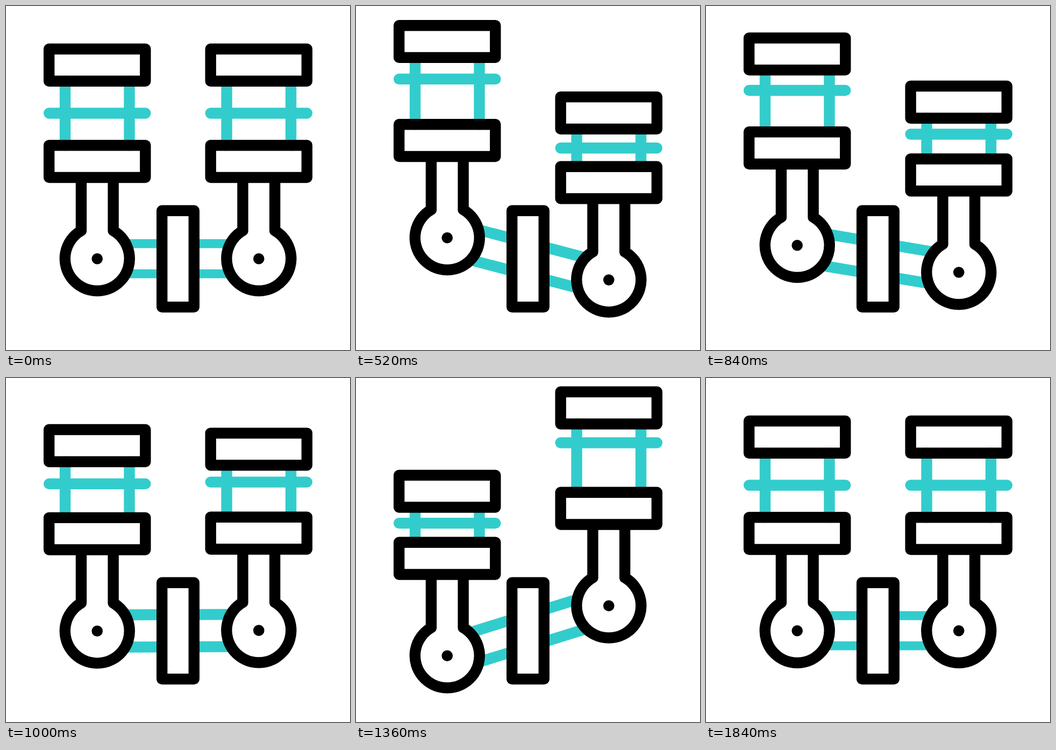
Animation of 640 by 640 pixels, one loop 2 s. Source, as an HTML page:

```html
<!DOCTYPE html>
<html lang="en">
<head>
<meta charset="utf-8">
<title>Pistons</title>
<style>
  html, body { margin: 0; width: 100%; height: 100%; overflow: hidden; background: #fff; }
  svg { display: block; width: 100%; height: 100%; }
  .ink { stroke: #000; stroke-width: 20.4; stroke-linejoin: round; fill: none; }
  .solid { fill: #fff; }
  .teal { stroke: #3cc; stroke-width: 20.4; stroke-linecap: round; fill: none; }
</style>
</head>
<body>
<svg viewBox="0 0 640 640">
  <g id="shaft" class="teal">
    <path id="upper"/>
    <path id="lower"/>
  </g>
  <rect class="ink solid" x="290.2" y="380.8" width="59.6" height="179.3"/>
  <g id="pistons"></g>
</svg>
<script>
const LOOP = 2000, STEP = 40;
const KEYS = [120, 697, 982, 1270, 1825];

// Vertical offsets at the three inner keys; every part rests at 0.
const MOVES = [
  { x: 0, head: [-56.5, 15, 108.5], ring: [-82, -3.5, 76], rod: [-50.3, 0, 50] },
  { x: 300.6, head: [115, 23.5, -58.3], ring: [83.5, -5, -85], rod: [50.8, 0, -50] }
];

const $ = id => document.getElementById(id);
const ease = x => x * x * (3 - 2 * x);

function offset(values, t) {
  if (t <= KEYS[0] || t >= KEYS[4]) return 0;
  const track = [0, ...values, 0];
  const i = KEYS.findIndex(k => k > t) - 1;
  const p = ease((t - KEYS[i]) / (KEYS[i + 1] - KEYS[i]));
  return track[i] + (track[i + 1] - track[i]) * p;
}

const box = y => `<rect x="80.1" y="${y}" width="179.2" height="59.7"`;

$("pistons").innerHTML = MOVES.map(m => `
  <g transform="translate(${m.x} 0)">
    <g class="rod">
      <path class="ink solid" d="M139.9 319V418A60 60 0 1 0 199.6 418V319"/>
      <circle cx="169.7" cy="470.2" r="10.3"/>
      ${box(259.3)} class="solid"/>
    </g>
    <path class="teal posts"/>
    <path class="teal ring" d="M80.1 199.5H259.3"/>
    <g class="head">${box(80)} class="ink"/></g>
    <g class="rod">${box(259.3)} class="ink"/></g>
  </g>`).join("");

const groups = [...$("pistons").children];
const shift = (el, y) => el.setAttribute("transform", `translate(0 ${y})`);

function draw(t) {
  const rods = MOVES.map((m, i) => {
    const g = groups[i];
    const head = offset(m.head, t), rod = offset(m.rod, t);
    shift(g.querySelector(".head"), head);
    shift(g.querySelector(".ring"), offset(m.ring, t));
    g.querySelectorAll(".rod").forEach(el => shift(el, rod));
    const top = 139.7 + head, end = 259.3 + rod;
    g.querySelector(".posts").setAttribute("d", `M110 ${top}V${end}M229.5 ${top}V${end}`);
    return rod;
  });

  // The shaft lines are thinner while everything rests.
  const moving = t > KEYS[0] && t < KEYS[4];
  const gap = moving ? 30 : 28.1;
  $("shaft").style.strokeWidth = moving ? 20.4 : 16.6;
  const line = d => `M170 ${470.2 + rods[0] + d}L470 ${470.2 + rods[1] + d}`;
  $("upper").setAttribute("d", line(-gap));
  $("lower").setAttribute("d", line(gap));
}

const start = performance.now();
function tick() {
  const t = (performance.now() - start) % LOOP;
  draw(Math.floor(t / STEP) * STEP);
  requestAnimationFrame(tick);
}
tick();
</script>
</body>
</html>
```
